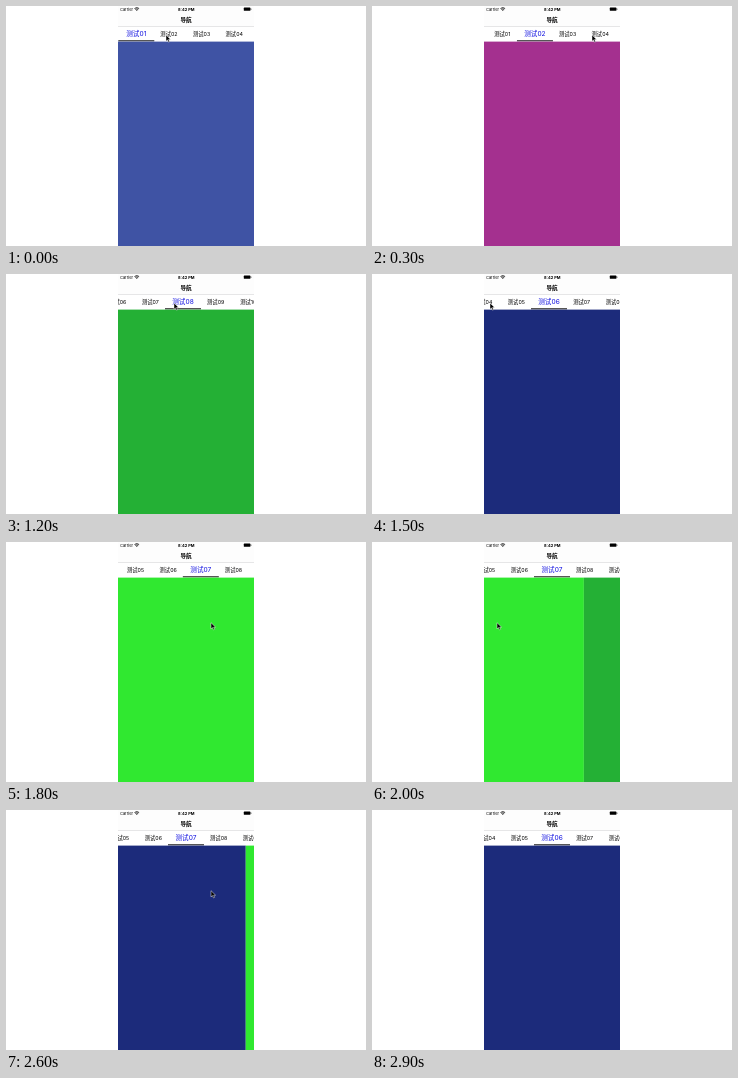
These frames come from a looping animation (360x240 px, 3 s). An HTML page:

```html
<!DOCTYPE html>
<html lang="zh-CN">
<head>
<meta charset="utf-8">
<title>导航</title>
<style>
html, body { margin: 0; width: 100%; height: 100%; overflow: hidden; background: #fff; }
svg { display: block; width: 360px; height: 240px; }
text { font-family: Inter, "Noto Sans CJK SC", "Noto Sans CJK", sans-serif; text-anchor: middle; fill: #000; }
.bar { font-size: 4px; }
.tab { font-size: 5.3px; }
.tab.on { font-size: 6.6px; fill: #1010e0; }
</style>
</head>
<body>
<svg viewBox="0 0 360 240">
  <defs><clipPath id="screen"><rect x="112" width="136" height="240"/></clipPath></defs>
  <rect width="360" height="240" fill="#fff"/>
  <g clip-path="url(#screen)">
    <rect x="112" width="136" height="20.7" fill="#fdfdfd"/>
    <rect x="112" y="20.4" width="136" height=".4" fill="#c4c4c6"/>
    <text class="bar" x="120.5" y="4.7">Carrier</text>
    <g fill="none" stroke="#000" stroke-width=".8">
      <path d="M128.5 2.5Q130.8 .7 133.1 2.5M129.4 3.5Q130.8 2.4 132.2 3.5"/>
      <path d="M130.3 4.1h1l-.5.6z" fill="#000" stroke-width=".3"/>
    </g>
    <text class="bar" x="180.3" y="4.7" font-weight="700">8:42 PM</text>
    <rect x="237.8" y="1.6" width="6.6" height="3.2" rx=".6" fill="#000"/>
    <rect x="244.7" y="2.6" width=".6" height="1.2" fill="#000"/>
    <text x="180" y="16" font-size="5.6" font-weight="700">导航</text>
    <g id="tabs"></g>
    <rect id="line" y="34.1" width="36" height="1.3" fill="#444"/>
    <g id="pages"></g>
  </g>
  <path id="cursor" d="M0 0V6.2L1.5 4.9L2.5 7.2L3.6 6.7L2.6 4.5H4.6Z" fill="#000" stroke="#fff" stroke-width=".45"/>
</svg>
<script>
const LOOP = 3000, STEP = 100, LEFT = 112, WIDTH = 136, GAP = 32.65, FIRST = 130.3;
const SWIPE = 300, SWIPES_FROM = 1500, LEAVE = 2900;
const COLORS = { 1: '#3f53a4', 2: '#a4308f', 6: '#1c2b7b', 7: '#30e830', 8: '#24b035' };
const $ = id => document.getElementById(id);
const clamp = u => Math.min(1, Math.max(0, u));
const smooth = u => u * u * (3 - 2 * u);
const lerp = (a, b, u) => a + (b - a) * u;

// tab-bar scroll that puts tab n at x
const scrollTo = (n, x) => Math.max(0, FIRST + (n - 1) * GAP - x);
const tap = (t, tab) => ({ t, tab, scroll: scrollTo(tab, 177) });
const flick = (t, tab, first, time) => ({ t, tab, scroll: scrollTo(first, 127), time });
const swipe = (t, tab) => ({ t, tab, scroll: scrollTo(tab, 180), swiped: true });

const acts = [
  tap(0, 1), tap(100, 2), flick(300, 2, 7, 400), tap(900, 8), tap(1400, 6),
  swipe(1800, 7), swipe(2100, 8), swipe(2400, 7), swipe(2700, 6)
];
// pointer stops along the tab bar: [time, x]
const stops = [[0, 160], [300, 220], [700, 157.5], [1200, 168], [1400, 118]];

function add(parent, name, attrs) {
  const el = document.createElementNS('http://www.w3.org/2000/svg', name);
  for (const k in attrs) el.setAttribute(k, attrs[k]);
  return parent.appendChild(el);
}

const tabs = Array.from({ length: 10 }, (_, i) => {
  const el = add($('tabs'), 'text', {});
  el.textContent = '测试' + String(i + 1).padStart(2, '0');
  return el;
});
const pages = Object.keys(COLORS).map(n => ({
  n: +n,
  el: add($('pages'), 'rect', { y: 35.6, width: WIDTH, height: 205, fill: COLORS[n] })
}));

function barScroll(t, i) {
  const { t: at, scroll, time } = acts[i];
  const from = i ? acts[i - 1].scroll : scroll;
  const u = time ? (t - at) / time : (t - at + 50) / 100;
  return lerp(from, scroll, smooth(clamp(u)));
}

// forward swipes start slowly, backward ones settle slowly
function swipeState(t) {
  const next = acts.findIndex(a => a.swiped && a.t > t);
  const i = next < 0 ? acts.length - 1 : next;
  const from = acts[i - 1].tab, to = acts[i].tab, dir = Math.sign(to - from);
  const u = clamp((t - acts[i].t) / SWIPE + 1);
  const eased = dir > 0 ? u ** 3.27 : 1 - (1 - u) ** 2.55;
  return { page: lerp(from, to, eased), x: 165 + dir * 40 * Math.cos(1.5 * Math.PI * u) };
}

function stopX(t) {
  const i = stops.findIndex(s => s[0] > t);
  if (i < 0) return stops[stops.length - 1][1];
  const [t0, x0] = stops[i - 1], [t1, x1] = stops[i];
  return lerp(x0, x1, smooth((t - t0) / (t1 - t0)));
}

function draw(t) {
  const now = acts.findLastIndex(a => a.t <= t);
  const sel = acts[now].tab, shift = barScroll(t, now);
  const tabX = n => FIRST + (n - 1) * GAP - shift;
  tabs.forEach((el, i) => {
    const on = i + 1 === sel;
    el.setAttribute('class', on ? 'tab on' : 'tab');
    el.setAttribute('x', tabX(i + 1));
    el.setAttribute('y', on ? 30 : 29.5);
  });
  $('line').setAttribute('x', tabX(sel) - 18);

  const swiping = t > SWIPES_FROM;
  const { page, x } = swiping ? swipeState(t) : { page: sel, x: stopX(t) };
  for (const p of pages) p.el.setAttribute('x', LEFT + (p.n - page) * WIDTH);

  $('cursor').setAttribute('transform', `translate(${x} ${swiping ? 80.7 : 29})`);
  $('cursor').style.display = t < LEAVE ? '' : 'none';
}

let start;
function frame(now) {
  start ??= now;
  draw(Math.floor((now - start) % LOOP / STEP) * STEP);
  requestAnimationFrame(frame);
}
draw(0);
requestAnimationFrame(frame);
</script>
</body>
</html>
```
